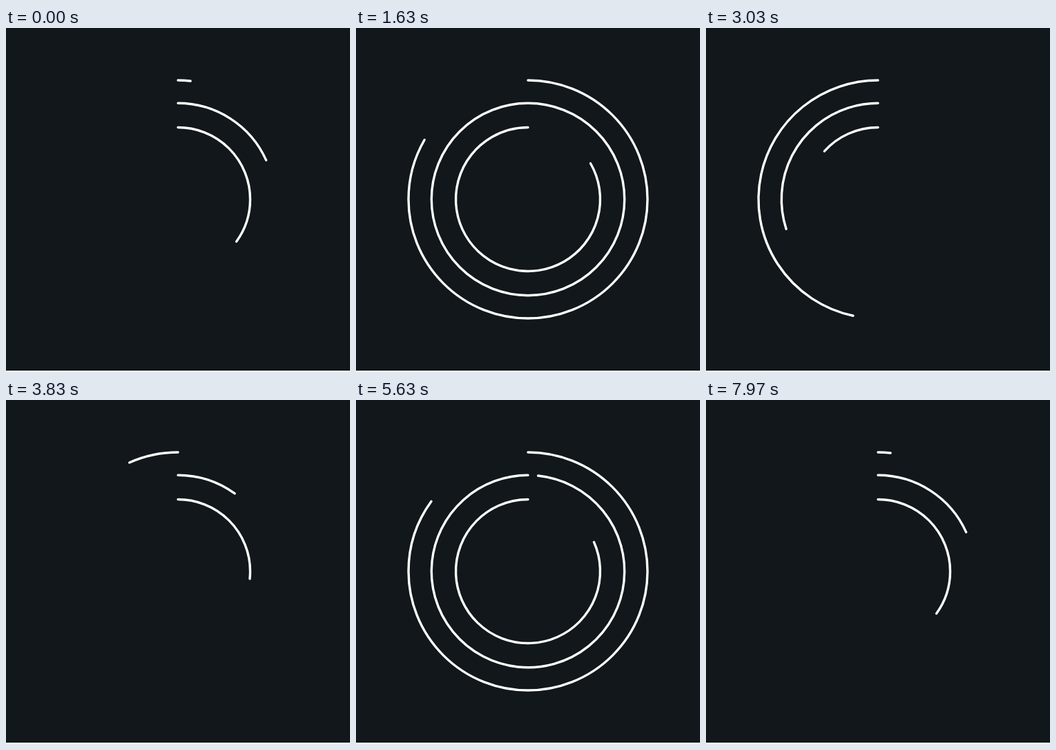
Recreate the animation shown at these times as an HTML page with a canvas. Size 498 by 500 pixels, loop 8010 ms.

```html
<!DOCTYPE html>
<html lang="en">
<head>
<meta charset="utf-8">
<title>Three rings</title>
<style>
  html, body { margin: 0; width: 100%; height: 100%; overflow: hidden; background: #fff; }
  canvas { display: block; }
</style>
</head>
<body>
<canvas id="stage" width="498" height="500"></canvas>
<script>
const ctx = document.getElementById('stage').getContext('2d');
const LOOP = 8010, STEP = 6, CENTER = 249;
const RADII = [173, 139.7, 104.5];
const LAG = 60;

// Steps run at 30 per second, rounded to 10 ms.
function stepAt(ms) {
  const tick = Math.floor(ms / 10) * 10;
  return Math.min(239, Math.floor((tick + 5) * 3 / 100));
}

// The second half jumps one step ahead.
function turnAt(step) {
  return (step + (step < 119 ? 1 : 2)) * STEP;
}

// The first turn draws the ring, the second wipes it from the top.
function ring(radius, turn) {
  const t = turn % 720;
  if (t === 0) return;
  const from = t > 360 ? t - 360 : 0;
  const to = Math.min(t, 360);
  const rad = deg => (deg - 90) * Math.PI / 180;
  ctx.beginPath();
  ctx.arc(CENTER, CENTER, radius, rad(from), rad(to));
  ctx.stroke();
}

function draw(ms) {
  // A white strip stays open along the bottom edge.
  ctx.fillStyle = '#fff';
  ctx.fillRect(0, 498, 498, 2);
  ctx.fillStyle = '#11171a';
  ctx.fillRect(0, 0, 498, 498);
  ctx.strokeStyle = '#fff';
  ctx.lineWidth = 3.4;
  ctx.lineCap = 'round';
  const turn = turnAt(stepAt(ms));
  RADII.forEach((r, i) => ring(r, turn + i * LAG));
}

const start = performance.now();
function tick() {
  draw((performance.now() - start) % LOOP);
  requestAnimationFrame(tick);
}
tick();
</script>
</body>
</html>
```
